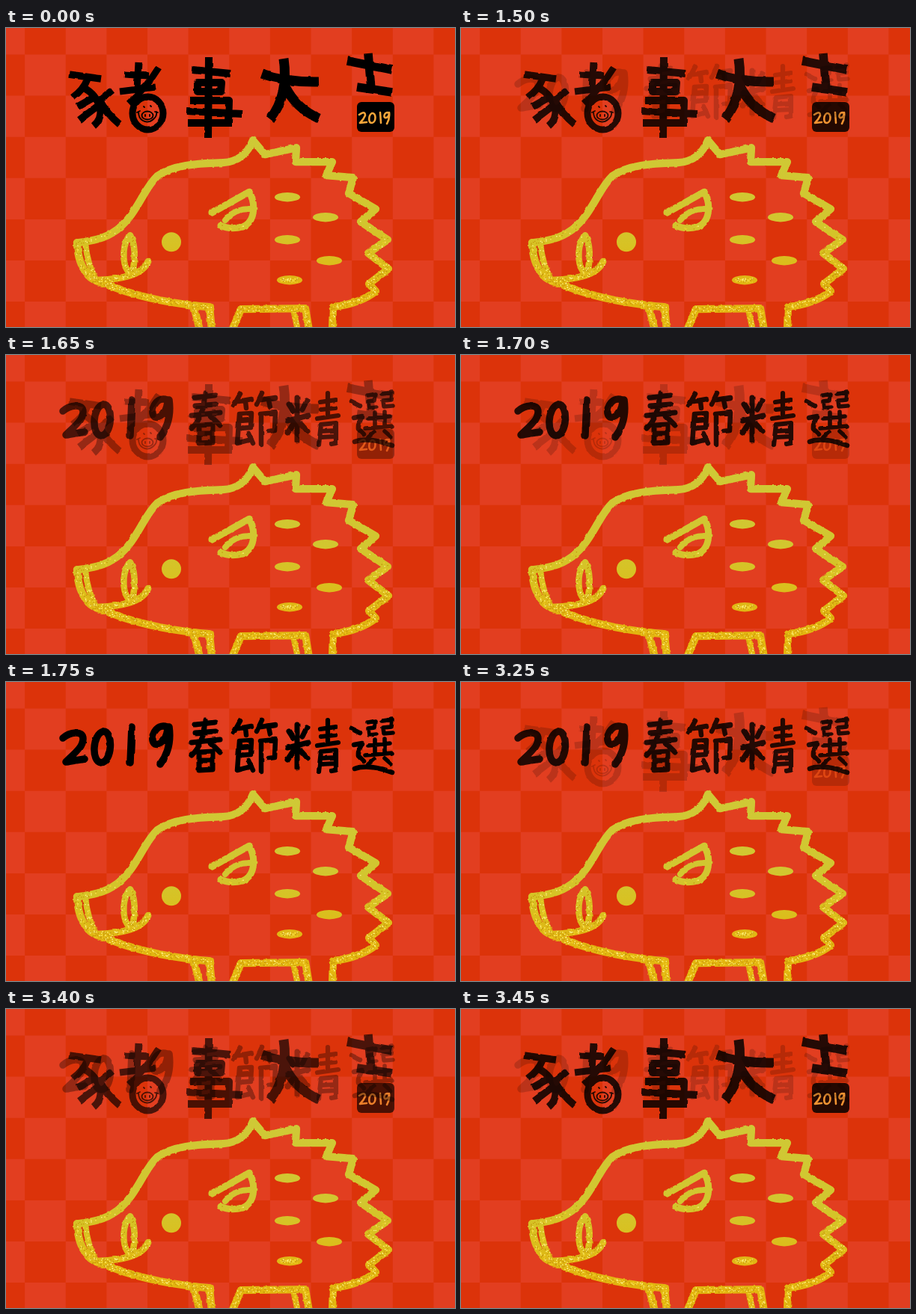
An HTML page that plays this animation: 600 by 400 pixels, repeating every 3500 ms.

```html
<!DOCTYPE html>
<html lang="zh-Hant">
<head>
<meta charset="utf-8">
<title>2019 春節精選</title>
<style>
  html, body { margin: 0; width: 100%; height: 100%; overflow: hidden; background: #dc330a; }
  svg { display: block; width: 100vw; height: 100vh; }
  .line { fill: none; stroke-linejoin: round; }
  .wish { stroke: #000; stroke-width: 11.5; }
  .head { stroke: #000; stroke-width: 7; stroke-linecap: round; }
  .thin { stroke: #000; stroke-width: 1.8; stroke-linecap: round; }
  .year { stroke: #f3a63a; stroke-width: 2.6; stroke-linecap: round; }
  .gold { stroke: url(#gold); stroke-width: 10.2; stroke-linecap: round; }
  .fill { fill: url(#gold); }
</style>
</head>
<body>
<svg viewBox="0 0 600 400" preserveAspectRatio="none">
  <defs>
    <linearGradient id="gold" gradientUnits="userSpaceOnUse" x1="0" y1="150" x2="0" y2="390">
      <stop offset="0" stop-color="#cfc936"/>
      <stop offset=".45" stop-color="#d2c62f"/>
      <stop offset=".65" stop-color="#d9c01f"/>
      <stop offset=".82" stop-color="#e2b411"/>
      <stop offset="1" stop-color="#e3b60f"/>
    </linearGradient>
    <filter id="chalk" filterUnits="userSpaceOnUse" x="0" y="0" width="600" height="405" color-interpolation-filters="sRGB">
      <feTurbulence type="fractalNoise" baseFrequency=".2" numOctaves="1" seed="5"/>
      <feDisplacementMap in="SourceGraphic" scale="3" xChannelSelector="R" yChannelSelector="G"/>
    </filter>
    <filter id="brush" filterUnits="userSpaceOnUse" x="0" y="0" width="600" height="160" color-interpolation-filters="sRGB">
      <feTurbulence type="fractalNoise" baseFrequency=".09" numOctaves="1" seed="3"/>
      <feDisplacementMap in="SourceGraphic" scale="3" xChannelSelector="R" yChannelSelector="G"/>
    </filter>
  </defs>

  <rect width="600" height="400" fill="#dc330a"/>
  <path id="checks" fill="#e23e20"/>

  <g id="boar" transform="translate(0 -.8)">
    <g class="line gold" filter="url(#chalk)">
      <path d="M436 405L437 374Q474 369 494 353L485 343L511 323L484 302L510 284L474 260L494 243L458 222L464 201L428 198L436 180L387 180L388 161L346 170L330 151C324 166 312 180 290 181C255 182 222 184 202 199C183 217 176 249 148 271C132 283 114 286 95 288"/>
      <path d="M95 288Q96 316 110 332Q116 339 130 342C162 356 210 369 272 374L275 405"/>
      <path d="M251 373L259 405"/>
      <path d="M302 405L314 377L400 376L405 405"/>
      <path d="M384 378L390 405" stroke-width="8"/>
      <path d="M106 289Q109 317 120 337" stroke-width="8"/>
      <path d="M122 338C153 337 182 332 190 313" stroke-width="9"/>
      <path d="M164 328C153 313 157 286 166 278C173 289 173 310 169 328" stroke-width="8.5"/>
      <path d="M275 248L325 220C335 238 332 261 316 267Q299 271 287 265" stroke-width="9"/>
      <path d="M293 258C302 246 316 242 329 243" stroke-width="8"/>
    </g>
    <g class="fill">
      <circle cx="221" cy="287" r="13"/>
      <g id="spots"></g>
    </g>
    <g id="glitter"></g>
  </g>

  <g id="wish" role="img" aria-label="豬事大吉">
    <g class="line wish" filter="url(#brush)">
      <path d="M84 62L127 68M109 68Q104 82 89 93M104 80Q121 89 126 108Q128 122 117 131M119 92L96 105M123 104L98 123M142 83L125 97M126 98Q135 115 152 129" stroke-width="9.5"/>
      <path d="M177 46L175 84M158 62L191 64M152 85L200 79M204 53Q188 79 164 101" stroke-width="9"/>
      <ellipse cx="189.500" cy="114" rx="20.500" ry="22" stroke-width="9"/>
      <path d="M271 39L270 147M249 56L300 61M256 73L288 73L287 85L256 85ZM246 97L298 97L297 127M241 111L316 115M243 127L302 127" stroke-width="10"/>
      <path d="M342 61Q376 73 418 72M371 41Q378 90 353 122M373 78Q387 107 418 121" stroke-width="13"/>
      <path d="M456 44L516 56M484 34L488 82M469 79L516 86"/>
    </g>
    <rect x="469" y="99" width="50" height="40" rx="6"/>
    <g class="line thin">
      <ellipse cx="189" cy="117" rx="7.500" ry="5.500"/>
      <path d="M186 116V118M192 116V118M184 105L185 106M193 104L194 105M177 112Q177 121 183 124Q190 128 197 122Q202 118 201 112M175 113L179 111M199 112L203 113"/>
    </g>
    <path class="line year" d="M472 116Q480 110 480 117Q478 122 473 127L482 126M489 114C484 117 484 127 489 127C495 126 495 113 489 114M500 113L501 127M512 114C506 110 503 121 508 120Q512 119 512 113Q513 121 509 128"/>
  </g>

  <g id="head" role="img" aria-label="2019 春節精選">
    <g class="line head" filter="url(#brush)">
      <path d="M76 75C85 67 103 64 103 76C103 89 87 99 80 107L105 103M130 66C115 70 114 107 127 108C142 107 144 66 130 66M168 60L166 108M215 60C201 54 190 76 199 83C208 86 216 73 216 60M218 60Q222 89 206 110" stroke-width="9.5"/>
      <path d="M253 57L279 54M253 68L280 66M248 81L286 77M266 51Q264 84 248 98M272 80L286 94M258 94L276 93L276 117L258 118ZM259 105L275 105"/>
      <path d="M313 52L304 68M311 62L328 59M320 62L321 71M342 51L335 66M341 60L360 57M351 60L353 70M312 79L328 78L327 97L312 98M312 88L327 87M312 79L309 118L328 113M324 105L330 118M340 79L360 77L359 101L351 102M341 79L341 120" stroke-width="6.500"/>
      <path d="M378 66L384 75M402 61L396 73M376 88L404 81M389 57L389 115M384 92L376 104M394 92L403 102"/>
      <path d="M420 63L441 60M421 73L440 71M416 85L444 81M430 51L430 82M421 93L418 120M421 93L441 91L441 118L435 119M421 102L440 101M421 110L440 109" stroke-width="6.200"/>
      <path d="M461 62L473 68M465 84L476 82Q470 93 471 99L478 106M466 116Q484 109 516 121" stroke-width="6.500"/>
      <path d="M483 54L494 52L493 61L484 62L485 71L495 70M502 52L516 50L515 60L504 61L505 69L517 68M484 85L513 82M480 98L516 95M493 77L493 96M506 76L506 95M492 103L484 110M506 102L514 109" stroke-width="5.600"/>
    </g>
  </g>
</svg>
<script>
const $ = id => document.getElementById(id);
const LOOP = 3500, STEP = 50, STEPS = 6, SWAP = 1500, BACK = 3250;

function seeded(s) {
  return () => (s = (s * 16807) % 2147483647) / 2147483647;
}

function drawChecks() {
  const w = 54.63, h = 55.1;
  let d = '';
  for (let row = 0; row < 8; row++)
    for (let col = row % 2; col < 12; col += 2)
      d += `M${-29.5 + col * w} ${row * h - 19.6}h${w}v${h}h${-w}z`;
  $('checks').setAttribute('d', d);
}

function drawSpots() {
  const at = [[376, 227], [427, 254], [376, 284], [432, 312], [379, 338]];
  $('spots').innerHTML = at.map(([x, y]) =>
    `<ellipse cx="${x}" cy="${y}" rx="17" ry="6.2"/>`).join('');
}

// Flecks lie along the gold lines and grow denser downwards.
function drawGlitter() {
  const rnd = seeded(2019), tones = ['#fff48a', '#c4950a', '#f6d52c'];
  const flecks = tones.map(() => '');
  const add = (x, y) => {
    if (rnd() > (y - 255) / 85) return;
    flecks[Math.floor(rnd() * 3)] += `M${x.toFixed(1)} ${y.toFixed(1)}h1.4v1.3h-1.4z`;
  };
  for (const path of document.querySelectorAll('#boar .gold path')) {
    const len = path.getTotalLength();
    for (let s = 0; s < len; s += 0.8) {
      const p = path.getPointAtLength(s);
      add(p.x + rnd() * 6.4 - 3.9, p.y + rnd() * 6.4 - 3.9);
    }
  }
  for (let i = 0; i < 60; i++) add(366 + rnd() * 25, 335 + rnd() * 5);
  $('glitter').innerHTML = flecks.map((d, i) => `<path d="${d}" fill="${tones[i]}"/>`).join('');
}

// Share of the second heading, changed in hard steps.
function mixAt(t) {
  const stepped = from => Math.min(1, (Math.floor((t - from) / STEP) + 1) / STEPS);
  if (t < SWAP) return 0;
  return t < BACK ? stepped(SWAP) : 1 - stepped(BACK);
}

function render(t) {
  const mix = mixAt(t);
  $('wish').setAttribute('opacity', 1 - mix);
  $('head').setAttribute('opacity', mix);
}

drawChecks();
drawSpots();
drawGlitter();
render(0);

const start = performance.now();
function tick() {
  render((performance.now() - start) % LOOP);
  requestAnimationFrame(tick);
}
requestAnimationFrame(tick);
</script>
</body>
</html>
```
